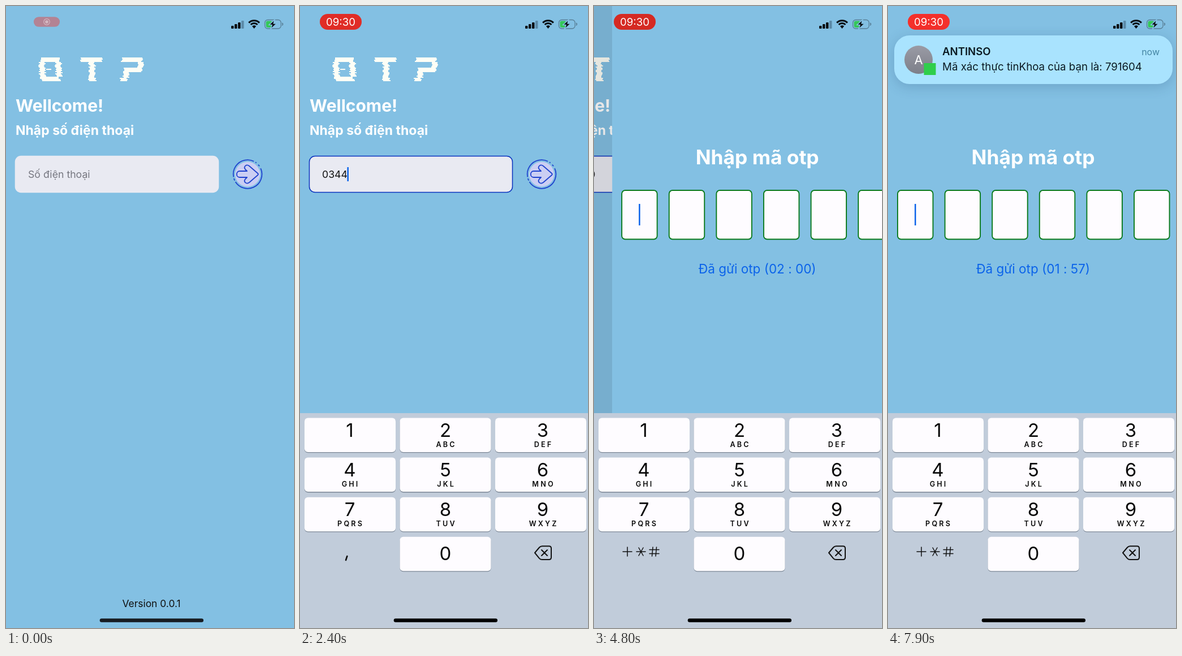
These frames come from a looping animation (509x1100 px, 8000 ms). An HTML page with a canvas:

```html
<!DOCTYPE html>
<html lang="vi">
<head>
<meta charset="utf-8">
<style>
html, body { margin: 0; height: 100%; overflow: hidden; background: #83c0e3; }
canvas { display: block; }
</style>
</head>
<body>
<canvas id="stage" width="509" height="1100"></canvas>
<script>
const W = 509, H = 1100, LOOP = 8000;
const c = document.getElementById('stage').getContext('2d');
const SKY = '#83c0e3', WHITE = '#fefcff', BLUE = '#0b63ea';

// Typing: each digit appears when its key is released
const PHONE = '0344466170';
const RELEASES = [1350, 1780, 2150, 2380, 2600, 2830, 3060, 3280, 3640, 3940];
const PRESS = 150;
const PUSH = 4470;

const progress = (t, start, length) => Math.min(1, Math.max(0, (t - start) / length));
const easeOut = p => 1 - (1 - p) ** 3;
const mix = (a, b, p) => a + (b - a) * p;
const mixColor = (a, b, p) => `rgb(${a.map((v, i) => Math.round(mix(v, b[i], p)))})`;

function text(str, x, y, size, color, weight = 400, align = 'left', spacing = 0) {
  c.font = `${weight} ${size}px Inter, sans-serif`;
  c.letterSpacing = spacing + 'px';
  c.textAlign = align;
  c.fillStyle = color;
  c.fillText(str, x, y);
}

function box(x, y, w, h, r, fill, stroke, lineWidth = 1.5) {
  c.beginPath();
  c.roundRect(x, y, w, h, r);
  if (fill) { c.fillStyle = fill; c.fill(); }
  if (stroke) { c.strokeStyle = stroke; c.lineWidth = lineWidth; c.stroke(); }
}

function disc(x, y, r, fill) {
  c.beginPath();
  c.arc(x, y, r, 0, 7);
  c.fillStyle = fill;
  c.fill();
}

function arc(x, y, r, from, to, color, lineWidth) {
  c.beginPath();
  c.arc(x, y, r, from * Math.PI / 180, to * Math.PI / 180);
  c.strokeStyle = color;
  c.lineWidth = lineWidth;
  c.stroke();
}

function line(d, color, lineWidth, fill) {
  const path = new Path2D(d);
  if (fill) { c.fillStyle = fill; c.fill(path); }
  c.strokeStyle = color;
  c.lineWidth = lineWidth;
  c.lineCap = c.lineJoin = 'round';
  c.stroke(path);
  c.lineCap = 'butt';
}

// Letter strips: [first row, last row, left, right]
const GLITCH = [
  [57, [[0, 8, 5, 38], [8, 34, 2, 12], [8, 34, 31, 41], [20, 22, 14, 23], [34, 42, 5, 38]]],
  [131, [[0, 8, 1, 39], [8, 36, 16, 26], [36, 42, 15, 28]]],
  [201, [[0, 8, 4, 40], [8, 18, 31, 41], [18, 26, 7, 39], [26, 36, 6, 16], [36, 42, 2, 14]]]
];

function glitchTitle() {
  c.fillStyle = '#fdfef6';
  for (const [x, strips] of GLITCH)
    for (const [top, bottom, left, right] of strips)
      for (let row = top; row < bottom; row += 2) {
        const noise = Math.sin(row * 12.9 + x * 3.7) * 43758.5;
        const shift = Math.round(((noise - Math.floor(noise)) - 0.5) * 4);
        c.fillRect(x + left + shift, 91 + row, right - left, 2);
      }
}

function arrowButton(alpha) {
  c.globalAlpha = alpha;
  disc(427, 297.5, 22, '#cbcef3');
  const ink = '#1f43cf';
  for (const [from, to] of [[-24, 148], [154, 163], [169, 296], [303, 308], [318, 326]])
    arc(427, 297.5, 25.3, from, to, ink, 1.8);
  line('M413 292 H426 L423 289 C419 284 425 279 430 283 L445 296 Q446.5 297.5 445 299 ' +
       'L430 312 C425 316 419 311 423 306 L426 303 H413 C406 303 406 292 413 292 Z', ink, 1.8);
  c.globalAlpha = 1;
}

function phoneScreen(t) {
  glitchTitle();
  text('Wellcome!', 17, 187, 30, '#fff', 700);
  text('Nhập số điện thoại', 17, 228, 23, '#fff', 700);
  const focus = progress(t, 750, 300);
  const accent = mixColor([118, 119, 128], [10, 50, 190], focus);
  box(16.5, 265.5, 359, 64, 10, '#e9eaf2', focus ? accent : '#e9eaf2');
  const typed = PHONE.slice(0, RELEASES.filter(r => t >= r).length);
  if (typed) text(typed, 39, 304, 17.7, '#111');
  else text('Số điện thoại', 39, 304, 17.7, accent);
  if (t > 800 && t < 4330) {
    c.font = '400 17.7px Inter, sans-serif';
    c.fillStyle = BLUE;
    c.fillRect(38.5 + c.measureText(typed).width, 285, 2.5, 25);
  }
  arrowButton(1 - 0.75 * progress(t, 4250, 120) + 0.75 * progress(t, 4430, 150));
  text('Version 0.0.1', 257, 1063, 17.4, '#111', 400, 'center');
}

function codeScreen(t) {
  text('Nhập mã otp', 256.5, 280, 35.3, '#fff', 700, 'center');
  for (let i = 0; i < 6; i++)
    box(17 + i * 83.6, 326, 62.5, 86.5, 6, WHITE, '#0a7a1c', 1.9);
  if ((t - 4500) % 1000 < 600) {
    c.fillStyle = BLUE;
    c.fillRect(47, 350, 2.5, 38);
  }
  const left = 120 - Math.max(0, Math.floor((t - 4500) / 1000));
  const pad = n => String(n).padStart(2, '0');
  text(`Đã gửi otp (${pad(Math.floor(left / 60))} : ${pad(left % 60)})`, 256.5, 473, 22.5, BLUE, 400, 'center');
}

const LETTERS = ['', 'ABC', 'DEF', 'GHI', 'JKL', 'MNO', 'PQRS', 'TUV', 'WXYZ'];

function key(digit, col, row, pressed) {
  const x = 8 + col * 168.5, y = 8.5 + row * 70.1;
  box(x, y + 1.3, 161, 60.5, 6, '#7c8896');
  box(x, y, 161, 60.5, 6, pressed ? '#9fb9d2' : WHITE);
  const mid = [88, 257, 429][col];
  text(digit, mid, y + (row < 3 ? 33 : 41), 33, '#080808', 400, 'center');
  if (digit > 0) text(LETTERS[digit - 1], mid + 1.6, y + 51, 12.6, '#080808', 600, 'center', 3.2);
}

function keyboard(t) {
  const rise = easeOut(progress(t, 687, 400));
  if (!rise) return;
  c.save();
  c.translate(0, H - 380 * rise);
  c.fillStyle = '#c1ccda';
  c.fillRect(0, 0, W, 400);
  const active = RELEASES.findIndex(r => t >= r - PRESS && t < r);
  const down = PHONE[active];
  for (let n = 1; n <= 9; n++)
    key(String(n), (n - 1) % 3, Math.floor((n - 1) / 3), down === String(n));
  key('0', 1, 3, down === '0');
  if (t < PUSH + 250) line('M83.3 253 L81 260', '#111', 2.6);
  else line('M51 245 h16 m-8 -8 v16 M75 245 h16 M79 238 l8 14 m0 -14 l-8 14 ' +
            'M98 241.5 h17 m-17 7 h17 M104 237 l-1.5 16 m8 -16 l-1.5 16', '#111', 1.5);
  line('M415 247 L423 237.5 Q425 235.3 428 235.3 H440 Q444 235.3 444 239 V255 Q444 259 440 259 ' +
       'H428 Q425 259 423 256.8 Z M427 242 l10 10 m0 -10 l-10 10', '#111', 2);
  c.restore();
}

function statusBar(t) {
  const grow = easeOut(progress(t, 0, 400));
  const pulse = Math.cos((t - 1800) / 2000 * 2 * Math.PI);
  c.save();
  c.translate(72, 28);
  c.scale(mix(0.62, 1, grow), mix(0.62, 1, grow));
  c.globalAlpha = mix(0.42, 1, grow);
  box(-37, -14, 74, 28, 14, `rgb(${229 + 16 * pulse},${45 + 3 * pulse},${39 + 4 * pulse})`);
  if (t < 2300) {
    arc(0, 0, 8.5, 0, 360, '#fff', 1.9);
    disc(0, 0, 4.5, '#fff');
  } else text('09:30', 0, 7, 18.6, '#fff', 400, 'center');
  c.restore();

  for (let i = 0; i < 4; i++)
    box(398 + i * 6, 35 - i * 3, 4.5, 5 + i * 3, 1, i < 3 ? '#090c10' : 'rgba(20,40,60,.35)');

  for (const r of [13.3, 8.4]) arc(438.5, 39, r, -135, -45, '#090c10', 3);
  c.beginPath();
  c.moveTo(438.5, 40);
  c.arc(438.5, 39, 4.8, -2.4, -0.75);
  c.fillStyle = '#090c10';
  c.fill();

  box(457.5, 24.5, 28.5, 15.5, 5, null, '#587f96', 1.3);
  box(459.5, 26.5, 11, 11.5, 3, '#35c759');
  arc(487, 32.3, 2.2, -70, 70, '#587f96', 1.6);
  line('M475 24 L464.5 33.5 H470 L467.5 41 L478.5 31 H473 Z', SKY, 1.6, '#090c10');
}

function notification(t) {
  const p = progress(t, 7280, 450);
  if (!p) return;
  c.save();
  c.translate(0, -150 * (1 - easeOut(p)));
  c.shadowColor = 'rgba(30,70,110,.22)';
  c.shadowBlur = 22;
  c.shadowOffsetY = 5;
  box(11, 52, 492, 86, 27, '#a9e3fe');
  c.shadowColor = 'transparent';
  const gray = c.createLinearGradient(0, 70, 0, 120);
  gray.addColorStop(0, '#9a9ba5');
  gray.addColorStop(1, '#7d7f89');
  disc(54, 95, 25, gray);
  text('A', 54, 103, 22, '#fff', 400, 'center');
  c.fillStyle = '#2fce4b';
  c.fillRect(63.5, 101, 21, 21);
  text('ANTINSO', 96, 87, 18.6, '#0b1a22', 600);
  text('now', 480, 87, 16, '#4585a3', 400, 'right');
  text('Mã xác thực tinKhoa của bạn là: 791604', 96, 114, 18.7, '#0b1a22');
  c.restore();
}

function draw(t) {
  c.fillStyle = SKY;
  c.fillRect(0, 0, W, H);
  const push = easeOut(progress(t, PUSH, 550));
  if (push < 1) {
    c.save();
    c.translate(-0.3 * W * push, 0);
    phoneScreen(t);
    c.restore();
  }
  if (push > 0) {
    const x = W * (1 - push);
    c.fillStyle = `rgba(0,0,0,${0.1 * push})`;
    c.fillRect(0, 0, x, H);
    c.save();
    c.translate(x, 0);
    c.fillStyle = SKY;
    c.fillRect(0, 0, W, H);
    codeScreen(t);
    c.restore();
  }
  keyboard(t);
  statusBar(t);
  notification(t);
  box(165.7, 1083.2, 183.3, 6.6, 3.3, mixColor([22, 27, 33], [0, 0, 0], progress(t, 687, 200)));
}

function tick() {
  draw(performance.now() % LOOP);
  requestAnimationFrame(tick);
}
tick();
</script>
</body>
</html>
```
